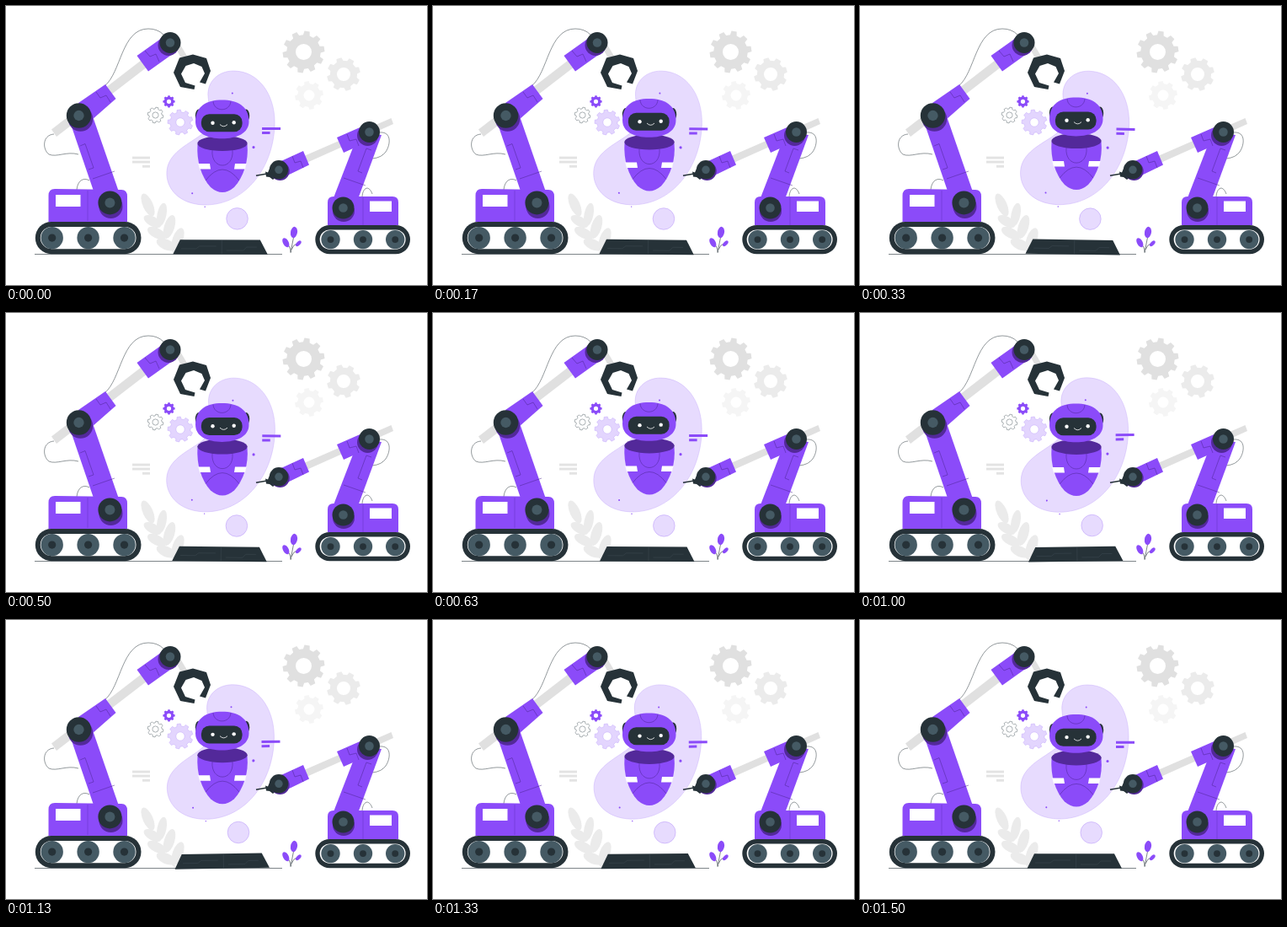
An HTML page with a canvas for the animation above (1540 ms loop, 500 by 331 pixels).

```html
<!DOCTYPE html>
<html lang="en">
<head>
<meta charset="utf-8">
<title>Robot workshop</title>
<style>
html, body { margin: 0; width: 100%; height: 100%; overflow: hidden; background: #fff; }
canvas { display: block; width: 500px; height: 331px; }
</style>
</head>
<body>
<canvas id="stage" width="500" height="331"></canvas>
<script>
const ctx = document.getElementById('stage').getContext('2d');
const LOOP = 1540, LEAD = 40;
const PURPLE = '#8b4bf9', DEEP = '#53299a', PALE = '#e7dbfe', DARK = '#263238', STEEL = '#455a64';

function paint(path, fill, stroke, width = 0.5) {
  if (fill) { ctx.fillStyle = fill; ctx.fill(path, 'evenodd'); }
  if (stroke) { ctx.strokeStyle = stroke; ctx.lineWidth = width; ctx.stroke(path); }
}
const shape = (d, fill, stroke, width) => paint(new Path2D(d), fill, stroke, width);
const thin = (d, color = DARK, width = 0.5) => shape(d, null, color, width);

function oval(x, y, rx, ry, fill, turn = 0, stroke) {
  const p = new Path2D();
  p.ellipse(x, y, rx, ry, turn, 0, 2 * Math.PI);
  paint(p, fill, stroke);
}
const disc = (x, y, r, fill, stroke) => oval(x, y, r, r, fill, 0, stroke);

function box(x, y, w, h, fill, radius = 0) {
  const p = new Path2D();
  p.roundRect(x, y, w, h, radius);
  paint(p, fill);
}

function gear(x, y, r, hole, teeth, fill, stroke, phase = 0) {
  const p = new Path2D(), step = 2 * Math.PI / teeth, root = r * 0.81;
  for (let i = 0; i < teeth; i++) {
    for (const [k, rad] of [[-0.31, root], [-0.2, r], [0.2, r], [0.31, root]]) {
      const a = phase + (i + k) * step;
      p.lineTo(x + rad * Math.cos(a), y + rad * Math.sin(a));
    }
  }
  p.closePath();
  p.moveTo(x + hole, y);
  p.arc(x, y, hole, 0, 2 * Math.PI);
  paint(p, fill, stroke);
}

function joint(x, y, r, dx, dy) {
  disc(x + dx, y + dy, r, DEEP);
  disc(x, y, r, DARK);
  disc(x, y, r * 0.42, STEEL);
}

function tracks(x, y, w, h, rim, wheels, r) {
  box(x, y, w, h, DARK, h / 2);
  box(x + rim, y + rim, w - 2 * rim, h - 2 * rim, '#fff', h / 2 - rim);
  for (const wx of wheels) {
    disc(wx, y + h / 2, r, STEEL);
    disc(wx, y + h / 2, r * 0.35, DARK);
  }
}

function backdrop() {
  gear(353.5, 54.5, 25, 9.5, 10, '#e0e0e0', null, 0.48);
  gear(401, 81, 20, 8, 8, '#ebebeb', null, 0.5);
  gear(360, 106, 17, 6.5, 8, '#f5f5f5', null, 0.6);
  box(150, 178.6, 21, 2.9, '#e3e3e3');
  box(150, 183.6, 21, 2.9, '#e3e3e3');
  box(162, 188.8, 9, 2.9, '#e3e3e3');
  const leaf = '#ebebeb';
  thin('M166 232Q176 268 201 293', leaf, 2.5);
  oval(168.5, 236, 6, 14.5, leaf, -0.42);
  oval(174, 255.5, 5.8, 11.5, leaf, -1.05);
  oval(185, 247.5, 5.5, 14, leaf, 0.2);
  oval(179, 269.5, 6, 12, leaf, -1.1);
  oval(194, 262, 6.2, 14.5, leaf, 0.3);
  oval(190, 283, 6.2, 12, leaf, -1.15);
  oval(204, 277, 6.2, 14.5, leaf, 0.35);
}

function cloud() {
  shape('M240 108C238 90 252 77 270 77C300 77 319 105 319 138C319 190 285 237 235 236' +
    'C205 235 190 216 191 197C192 175 215 165 230 154C248 142 241 122 240 108Z', PALE, '#c9b0fb');
  disc(274.7, 252.3, 12.8, PALE, '#b493f9');
  disc(268.7, 103.5, 1, PURPLE);
  disc(294, 167.5, 1.6, PURPLE);
  disc(221.3, 222.2, 1, PURPLE);
  disc(236.3, 238.3, 0.7, PURPLE);
  box(304, 143.8, 22, 3, PURPLE);
  box(304, 149, 9.5, 3, PURPLE);
  shape('M207 277.3H302L311 294.7H198.5Z', DARK);
  thin('M256.5 278V294M208 288H226L230 285H250M262 290H282L286 286H298', '#45515a', 0.4);
}

function robot() {
  shape('M227.5 164C226 184 232 203 243 215Q257 227 271 215C282 203 288.5 184 286.5 164Z', PURPLE);
  shape('M228.3 187H242L243 193.5H230Z M272 187H285.5L284 193.5H271Z', '#fff');
  thin('M245 171C243 195 271 195 269 171M237 207Q257 181 277 207', '#4b2590');
  oval(257, 163, 29.7, 9, DEEP);
  oval(229, 130, 4.2, 7.5, DARK);
  oval(285, 130, 4.2, 7.5, DARK);
  shape('M225 137C225 119 238 111.5 256.5 111.5S288.5 119 288.5 137' +
    'C288.5 151 274 157.3 256.5 157.3S225 151 225 137Z', PURPLE);
  thin('M246 113C247 126 266 126 267 113', '#4b2590');
  box(231.9, 128.3, 48.7, 21, DARK, 9.5);
  disc(245.5, 138.7, 2.2, '#fff');
  disc(270.7, 138.2, 2.2, '#fff');
  thin('M254 140.5Q258.5 145 263 140.5', '#fff', 0.8);
}

function leftMachine() {
  thin('M117 95C137 79 137 27 169 27Q180 27 187 34');
  thin('M57 152C43 153 43 170 51 176C60 180 72 172 86 176');
  thin('M84 218C85 207 92 203 99 207');
  shape('M54 146.5L187 44L194 52L60 155Z', '#e0e0e0');
  shape('M202 51L207 46L219 66L212 69Z', '#e0e0e0');
  shape('M199 79L206 61.5L222 57.5L238 62L243 77L237 92.5L230 90.5L236 80L232.5 72L223 68L213.5 71' +
    'L208 80.5L213 91L224.5 94.5L223.5 99L207 96Z', DARK);
  shape('M50.5 256V225Q50.5 217 58 217L137 218Q144 218 144 226V256Z', PURPLE);
  thin('M97 219V255', '#6632c0');
  box(59, 224, 29.5, 14, '#fff');
  tracks(34.8, 256, 125.7, 38.2, 6, [54.7, 97.6, 140.5], 13.2);
  disc(124.5, 238, 14, DEEP);
  shape('M76.5 139L103 131L138 232L110 237Z', PURPLE);
  thin('M88 166L94 163.5L104 192L98 194M103 205L129 196', '#4b2590');
  disc(123.4, 233.4, 14, DARK);
  disc(123.4, 233.4, 6, STEEL);
  shape('M86 115L118 93L130.5 110L102 135Z', PURPLE);
  thin('M107 102L112 109L119 106L124 114', '#4b2590');
  joint(86.5, 130, 14.7, 2, 4);
  shape('M155.5 59L185 38L202 54L169 77.5Z', PURPLE);
  thin('M165 53L171 60L178 57L182 66', '#4b2590');
  joint(195, 43.5, 12.5, -2, 3);
}

function rightMachine() {
  thin('M444 150C458 149 457 164 451 173Q446 180 435 181');
  thin('M423 226C424 215 431 212 435 223');
  shape('M457.5 133L460 140L357 186L354 178Z', '#e0e0e0');
  shape('M382 260V233Q382 226 389 226H459Q466 226 466 233V260Z', PURPLE);
  thin('M424 227V260', '#6632c0');
  box(432, 231.5, 26, 12.5, '#fff');
  tracks(367.3, 260, 112.7, 34.2, 5.4, [385.5, 424, 462.2], 11.2);
  disc(401, 243, 13, DEEP);
  shape('M419 150L446 153L414 240L386.5 234Z', PURPLE);
  thin('M434 171L428 169L418 196L423 198M401 204L427 213', '#4b2590');
  disc(400.5, 239.5, 13, DARK);
  disc(400.5, 239.5, 5.3, STEEL);
  shape('M393 156L425 142L432 160L401 174Z', PURPLE);
  thin('M405 152L408 160L416 158L419 166', '#4b2590');
  joint(431.5, 149.5, 12.5, -2, 4);
  thin('M297 201.3L310 199', DARK, 1.5);
  shape('M308 196.5L311 197.5L313 193L316 195.5L322 194V202L317 206L313 203L309 202.5Z', DARK);
  shape('M318 188L353 172L360 188.5L326 205Z', PURPLE);
  thin('M340 178L343 186L350 184L353 192', '#4b2590');
  joint(324, 194.3, 11.2, 1.5, 1.5);
}

function sprout() {
  thin('M342 272Q340 282 338 293M333 282Q338 285 338 292M347 281Q341 283 339 289', DARK, 0.6);
  oval(342, 268.5, 4, 6.7, PURPLE, 0.15);
  oval(332.3, 280.7, 3.3, 6, PURPLE, -0.5);
  oval(347.3, 281.7, 2.2, 4.2, PURPLE, 0.75);
}

// Triangle wave: 0 at the start, 1 after a half turn, linear between.
const triangle = turn => 1 - Math.abs(1 - 2 * (((turn % 1) + 1) % 1));

function frame(now) {
  const turn = (now + LEAD) / LOOP;
  const sway = 2 * triangle(turn + 0.25) - 1;
  ctx.fillStyle = '#fff';
  ctx.fillRect(0, 0, 500, 331);
  backdrop();
  thin('M34 294.5H328', DARK, 0.6);

  ctx.save();
  ctx.translate(256, 175);
  ctx.rotate(sway * Math.PI / 180);
  ctx.translate(-256, -175);
  cloud();
  ctx.restore();

  gear(193.5, 113.3, 7.2, 2.6, 8, PURPLE);
  gear(177.5, 129.5, 9.4, 3.6, 8, '#fff', '#59646a', 0.2);
  gear(207, 138, 15, 5.2, 9, '#e3d5fe', '#c3a8fb', 0.4);

  ctx.save();
  ctx.translate(0, 0.4 - 6.8 * triangle(turn));
  robot();
  ctx.restore();

  leftMachine();
  rightMachine();
  sprout();
  requestAnimationFrame(frame);
}
requestAnimationFrame(frame);
</script>
</body>
</html>
```
